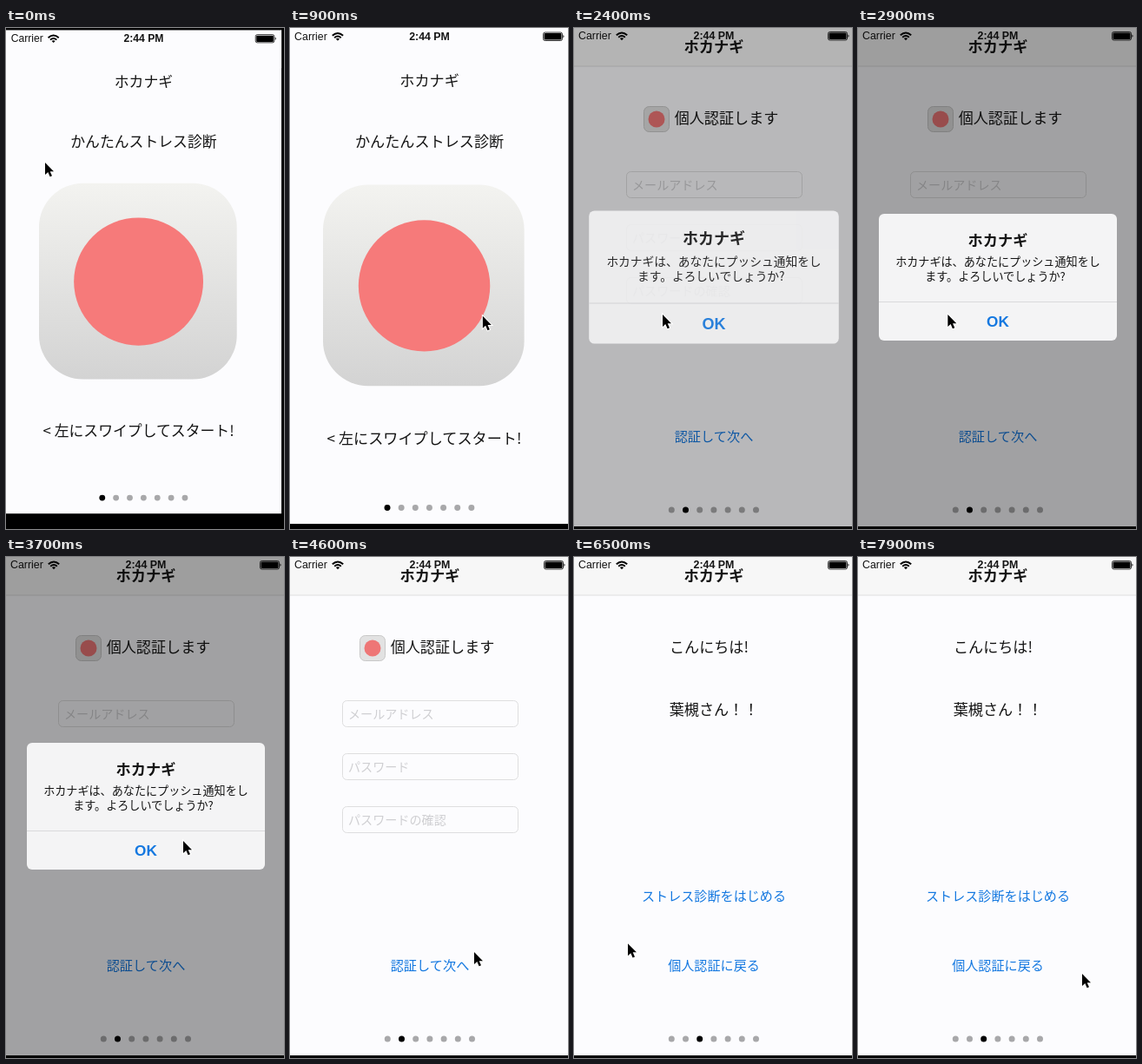
Write an HTML page that moves like this. It is 320 px wide and 577 px high and loops after 8 s.

```html
<!DOCTYPE html>
<html lang="ja">
<head>
<meta charset="utf-8">
<title>ストレス診断</title>
<style>
  html, body { margin: 0; width: 100%; height: 100%; overflow: hidden; background: #000; }
  svg { display: block; width: 100vw; height: 100vh; }
  text { font-family: "Noto Sans CJK JP", "Noto Sans CJK", sans-serif; text-anchor: middle; fill: #141414; }
  .latin { font-family: "Liberation Sans", sans-serif; }
  .bold { font-weight: bold; }
  .start { text-anchor: start; }
  .link { fill: #1478e0; }
  .hint { fill: #cfcfd2; }
  .nav { fill: #f7f7f7; }
  .rule { stroke: #dededf; fill: none; }
</style>
</head>
<body>
<svg viewBox="0 0 320 577" preserveAspectRatio="none">
  <defs>
    <clipPath id="bounds"><path d="M-2-1H323V574H-2Z"/></clipPath>
    <linearGradient id="tile" x2="0" y2="1">
      <stop stop-color="#f3f3f0"/><stop offset="1" stop-color="#d3d3d3"/>
    </linearGradient>
  </defs>
  <g id="screen">
    <g clip-path="url(#bounds)">
      <path d="M-2-1H323V574H-2Z" fill="#fcfcfe"/>
      <g id="pages"></g>
      <g id="dots"></g>
      <g id="status"></g>
      <path id="dim" d="M-2-1H323V574H-2Z"/>
      <g id="alert"></g>
    </g>
  </g>
  <path id="cursor" d="M0 0V14L3.3 11L5.6 16.3L8 15.3L5.7 10.2H10Z" stroke="#fff" stroke-width="2" paint-order="stroke"/>
</svg>
<script>
const $ = id => document.getElementById(id);
const W = 322, MID = 161, APP = 'ホカナギ';

// Text centred vertically on y
const text = (x, y, size, str, cls = '') =>
  `<text x="${x}" y="${y}" dy=".38em" font-size="${size}" class="${cls}">${str}</text>`;

const nav = id =>
  `<rect id="${id}" y="-1" width="${W}" height="45" class="nav"/>
   <path id="${id}Rule" d="M0 44H${W}" class="rule"/>` + text(MID, 21, 17.2, APP, 'bold');

const field = (y, hint) =>
  `<rect x="60.5" y="${y - 15}" width="202" height="30" rx="5" class="rule"/>` +
  text(67, y, 14.1, hint, 'hint start');

const page = (index, content) => `<g transform="translate(${index * W})">${content}</g>`;

$('pages').innerHTML =
  page(0,
    text(MID, 60, 17.2, APP) +
    text(MID, 131, 17.2, 'かんたんストレス診断') +
    `<rect x="38" y="181" width="232.5" height="233" rx="52" fill="url(#tile)"/>
     <circle cx="155" cy="298" r="76" fill="#f67a7a"/>` +
    text(155, 475, 17.2, '&lt; 左にスワイプしてスタート!')) +
  page(1,
    nav('navLogin') +
    `<rect x="80.5" y="90.5" width="29" height="29" rx="6" fill="#e2e2e2" stroke="#c8c8c8"/>
     <circle cx="95" cy="105" r="9.5" fill="#ee7676"/>` +
    text(175.5, 104, 17.1, '個人認証します') +
    field(180.5, 'メールアドレス') +
    field(241.5, 'パスワード') +
    field(302.5, 'パスワードの確認') +
    text(MID, 470.5, 15.2, '認証して次へ', 'link')) +
  page(2,
    nav('navHome') +
    text(155.5, 104, 17.1, 'こんにちは!') +
    text(MID, 175.5, 17.1, '葉槻さん！！') +
    text(MID, 390, 15.1, 'ストレス診断をはじめる', 'link') +
    text(MID, 470.5, 15.1, '個人認証に戻る', 'link'));

for (let i = 0; i < 7; i++)
  $('dots').innerHTML += `<circle cx="${112.3 + i * 16.2}" cy="555" r="3.5"/>`;

$('status').innerHTML =
  text(5, 8.6, 12.4, 'Carrier', 'latin start') +
  text(MID, 8.6, 12.4, '2:44 PM', 'latin bold') +
  `<path d="M48.8 8.2Q55 2.6 61.2 8.2M51.2 10.7Q55 7.2 58.8 10.7" fill="none" stroke="#000" stroke-width="1.9"/>
   <path d="M55 14.2L52.9 12Q55 10.4 57.1 12Z"/>
   <rect x="292.5" y="4.5" width="22" height="9.5" rx="2" fill="none" stroke="#000" stroke-width=".8"/>
   <rect x="293.5" y="5.5" width="20" height="7.5" rx="1"/>
   <path d="M315.5 7.5q2 1.7 0 3.5z"/>`;

$('alert').innerHTML =
  `<rect x="24" y="214" width="274" height="146" rx="6" fill="#f4f4f5"/>
   <path d="M24 315.5H298" stroke="#d9d9db"/>` +
  text(MID, 244, 17.2, APP, 'bold') +
  text(MID, 269.5, 13.1, APP + 'は、あなたにプッシュ通知をし') +
  text(158, 286, 13.1, 'ます。よろしいでしょうか?') +
  text(MID, 337.5, 17.2, 'OK', 'latin bold link');

const ramp = (t, a, b) => Math.min(1, Math.max(0, (t - a) / (b - a)));
const smooth = u => u * u * (3 - 2 * u);
const easeOut = u => 1 - (1 - u) ** 2;

// Pointer stops: time, x, y
const path = [
  [100, 45, 155], [1000, 228, 338], [1500, 228, 336], [2065, 102, 330],
  [2850, 102, 330], [3600, 204, 327], [3720, 204, 327], [3980, 168, 337],
  [4180, 168, 337], [4600, 212, 455], [4700, 212, 455], [5080, 195.5, 440],
  [5400, 163, 437], [5720, 163, 437], [6080, 62, 444], [6850, 62, 446],
  [7400, 262, 495], [7550, 262, 495], [7880, 258, 480]
];

function pointer(t) {
  const i = path.findIndex(p => p[0] > t);
  if (i < 0) return path[path.length - 1].slice(1);
  if (i === 0) return path[0].slice(1);
  const [a, b] = [path[i - 1], path[i]], u = smooth(ramp(t, a[0], b[0]));
  return [a[1] + (b[1] - a[1]) * u, a[2] + (b[2] - a[2]) * u];
}

// The page follows the pointer until release, then glides home
function swipe(t, grab, release, end) {
  if (t < grab) return 0;
  const moved = pointer(Math.min(t, release))[0] - pointer(grab)[0];
  return moved + (-W - moved) * easeOut(ramp(t, release, end));
}

function draw(t) {
  const back = 1 - smooth(ramp(t, 100, 1200));
  $('screen').setAttribute('transform',
    `translate(${.78 * back} ${3.3 * back}) scale(${1 - .0206 * back} ${1 - .031 * back})`);

  const offset = swipe(t, 1500, 1950, 2250) + swipe(t, 5080, 5900, 6280);
  $('pages').setAttribute('transform', `translate(${offset})`);

  const current = t < 2250 ? 0 : t < 6280 ? 1 : 2;
  [...$('dots').children].forEach((dot, i) => dot.setAttribute('fill', i === current ? '#000' : '#a8a8aa'));

  const navHeight = current === 2 ? 44 : 52;
  $('navHome').setAttribute('height', navHeight + 1);
  $('navHomeRule').setAttribute('d', `M0 ${navHeight}H${W}`);

  const shown = easeOut(ramp(t, 2200, 2600));
  const visible = shown * (1 - smooth(ramp(t, 4060, 4360)));
  const scale = 1.2 - .2 * shown;
  $('dim').setAttribute('opacity', .36 * visible);
  $('alert').setAttribute('opacity', Math.min(1, visible * 1.15));
  $('alert').setAttribute('transform', `translate(${MID} 287) scale(${scale}) translate(${-MID} -287)`);

  $('cursor').setAttribute('transform', `translate(${pointer(t)})`);
}

(function tick() {
  draw(performance.now() % 8000);
  requestAnimationFrame(tick);
})();
</script>
</body>
</html>
```
